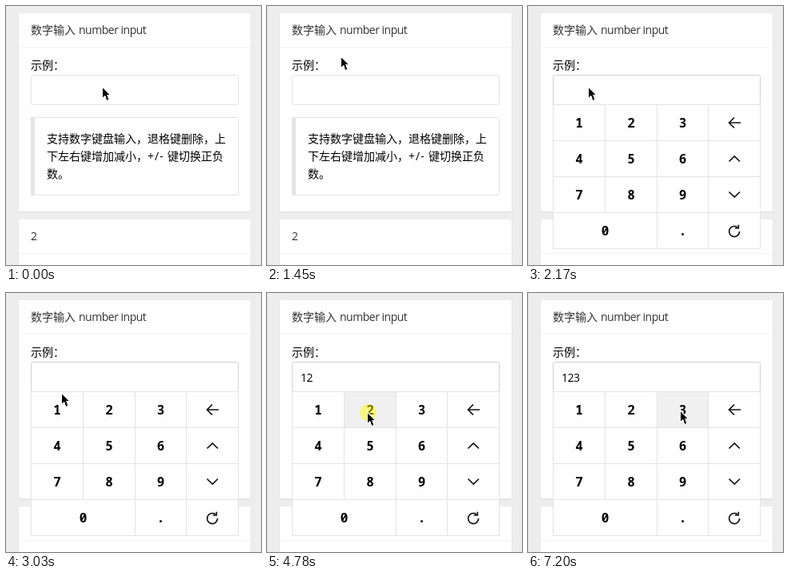
These frames come from a looping animation (319x324 px, 8 s). An HTML page:

```html
<!DOCTYPE html>
<html lang="zh-CN">
<head>
<meta charset="utf-8">
<title>数字输入</title>
<style>
  html, body { margin: 0; width: 100%; height: 100%; overflow: hidden; background: #ededed; }
  svg { display: block; }
  text { font: 350 14px "Noto Sans CJK SC", "Noto Sans CJK", sans-serif; white-space: pre; }
  .latin { font: 14px "Open Sans", "Noto Sans", sans-serif; letter-spacing: -.5px; }
  .sign { letter-spacing: 1px; }
  .head { fill: #333; }
  .card { fill: #fefefe; filter: drop-shadow(0 1px 1px rgba(0, 0, 0, .06)); }
  .rule { fill: #f4f4f4; }
  .box, .key { fill: #fefefe; stroke: #e4e4e4; }
  .key.down { fill: #f0f0f0; }
  .digit { font: bold 16px "Noto Sans Mono", "DejaVu Sans Mono", monospace; text-anchor: middle; }
  .icon { fill: none; stroke: #111; stroke-width: 1.7; }
</style>
</head>
<body>
<svg width="319" height="324" viewBox="0 0 319 324">
  <rect width="319" height="324" fill="#ededed"/>
  <rect width="1" height="324" fill="#e4e4e4"/>

  <rect class="card" x="16" y="9" width="290" height="248" rx="2"/>
  <rect class="rule" x="16" y="51" width="290" height="1"/>
  <text class="head" x="31" y="35">数字输入</text>
  <text class="head latin" x="91" y="35">number input</text>
  <text x="31" y="79">示例：</text>
  <rect id="field" class="box" x="31.5" y="86.5" width="259" height="37" rx="2"/>
  <text id="value" class="latin" x="42" y="111"></text>

  <rect class="box" x="31.5" y="139.5" width="259" height="97" rx="2"/>
  <rect x="31" y="139" width="5" height="98" fill="#e4e4e4"/>
  <text x="51" y="171">支持数字键盘输入，退格键删除，上</text>
  <text x="51" y="193">下左右键增加减小，</text>
  <text class="latin sign" x="177" y="193">+/-</text>
  <text x="202" y="193">键切换正负</text>
  <text x="51" y="215">数。</text>

  <rect class="card" x="16" y="267" width="290" height="70" rx="2"/>
  <rect class="rule" x="16" y="309" width="290" height="1"/>
  <text class="head latin" x="31" y="293">2</text>

  <g id="pad">
    <g id="keys"></g>
    <path class="icon" d="M258 139.5 L251.5 146 L258 152.5 M251.5 146 H266"/>
    <path class="icon" d="M251.5 194.5 L258.3 188 L265 194.5"/>
    <path class="icon" d="M251.5 232.5 L258.3 239 L265 232.5"/>
    <path class="icon" d="M264.6 282 A6.5 6.5 0 1 1 261.8 276.7 M263.3 273.8 V278 H258.8"/>
  </g>

  <circle id="ring" r="10.5" fill="#ff0" fill-opacity=".47"/>
  <path id="cursor" d="M0 0 V12.6 L2.9 9.9 L5.3 15.8 L7.4 14.9 L5 9.1 H8.8 Z"
        fill="#000" stroke="#fff" stroke-width="1.6" paint-order="stroke" shape-rendering="crispEdges"/>
</svg>
<script>
const LOOP = 8000;
const TICK = 135;
const PAD_OPENS = 2170;

// Pointer strokes: the tip travels to (x, y) in even ticks
const home = { x: 121, y: 102 };
const strokes = [
  { from: 250, to: 640, x: 105, y: 98 },
  { from: 790, to: 790, x: 99, y: 62 },
  { from: 910, to: 1030, x: 98, y: 51 },
  { from: 1330, to: 1750, x: 76, y: 102 },
  { from: 2880, to: 3300, x: 63, y: 149 },
  { from: 4360, to: 4630, x: 126, y: 150 },
  { from: 5300, to: 5570, x: 180, y: 149 },
  { from: 5720, to: 5990, x: 191, y: 148 }
];
const clicks = [1030, 1900, 3580, 4780];
const presses = [
  { digit: "1", from: 3580, to: 3580 + TICK },
  { digit: "2", from: 4780, to: 4780 + TICK },
  { digit: "3", from: 7200, to: LOOP }
];

const byId = id => document.getElementById(id);
const [field, value, pad, keyLayer, ring, cursor] =
  ["field", "value", "pad", "keys", "ring", "cursor"].map(byId);

function add(tag, attrs, text = "") {
  const el = document.createElementNS("http://www.w3.org/2000/svg", tag);
  for (const name in attrs) el.setAttribute(name, attrs[name]);
  el.textContent = text;
  return keyLayer.appendChild(el);
}

const keys = {};
const edge = col => 31.5 + Math.round(col * 64.75);
function addKey(label, row, from, to) {
  const x = edge(from), width = edge(to) - x, y = 123.5 + row * 45;
  keys[label] = add("rect", { class: "key", x, y, width, height: 45 });
  add("text", { class: "digit", x: x + width / 2, y: y + 28.5 }, label);
}

["123 ", "456 ", "789 "].forEach((labels, row) =>
  [...labels].forEach((label, col) => addKey(label, row, col, col + 1)));
addKey("0", 3, 0, 2);
addKey(".", 3, 2, 3);
addKey(" ", 3, 3, 4);

function pointerAt(t) {
  let { x, y } = home;
  for (const s of strokes) {
    if (t < s.from) break;
    const steps = Math.round((s.to - s.from) / TICK);
    const done = steps ? Math.floor((t - s.from) / (s.to - s.from) * steps) : 0;
    const p = Math.min(1, (done + 1) / (steps + 1));
    x += (s.x - x) * p;
    y += (s.y - y) * p;
  }
  return [Math.round(x), Math.round(y)];
}

const within = (t, from, to) => t >= from && t < to;
const show = (el, on) => el.setAttribute("visibility", on ? "visible" : "hidden");

function draw(t) {
  const [x, y] = pointerAt(t);
  cursor.setAttribute("transform", `translate(${x} ${y})`);
  ring.setAttribute("transform", `translate(${x + 0.5} ${y - 0.5})`);
  show(ring, clicks.some(at => within(t, at, at + TICK)));

  const open = t >= PAD_OPENS;
  show(pad, open);
  field.style.stroke = open ? "#d2d2d2" : "";
  value.textContent = presses.filter(p => p.from <= t).map(p => p.digit).join("");
  for (const p of presses) keys[p.digit].classList.toggle("down", within(t, p.from, p.to));
}

const start = performance.now();
function tick() {
  draw((performance.now() - start) % LOOP);
  requestAnimationFrame(tick);
}
tick();
</script>
</body>
</html>
```
